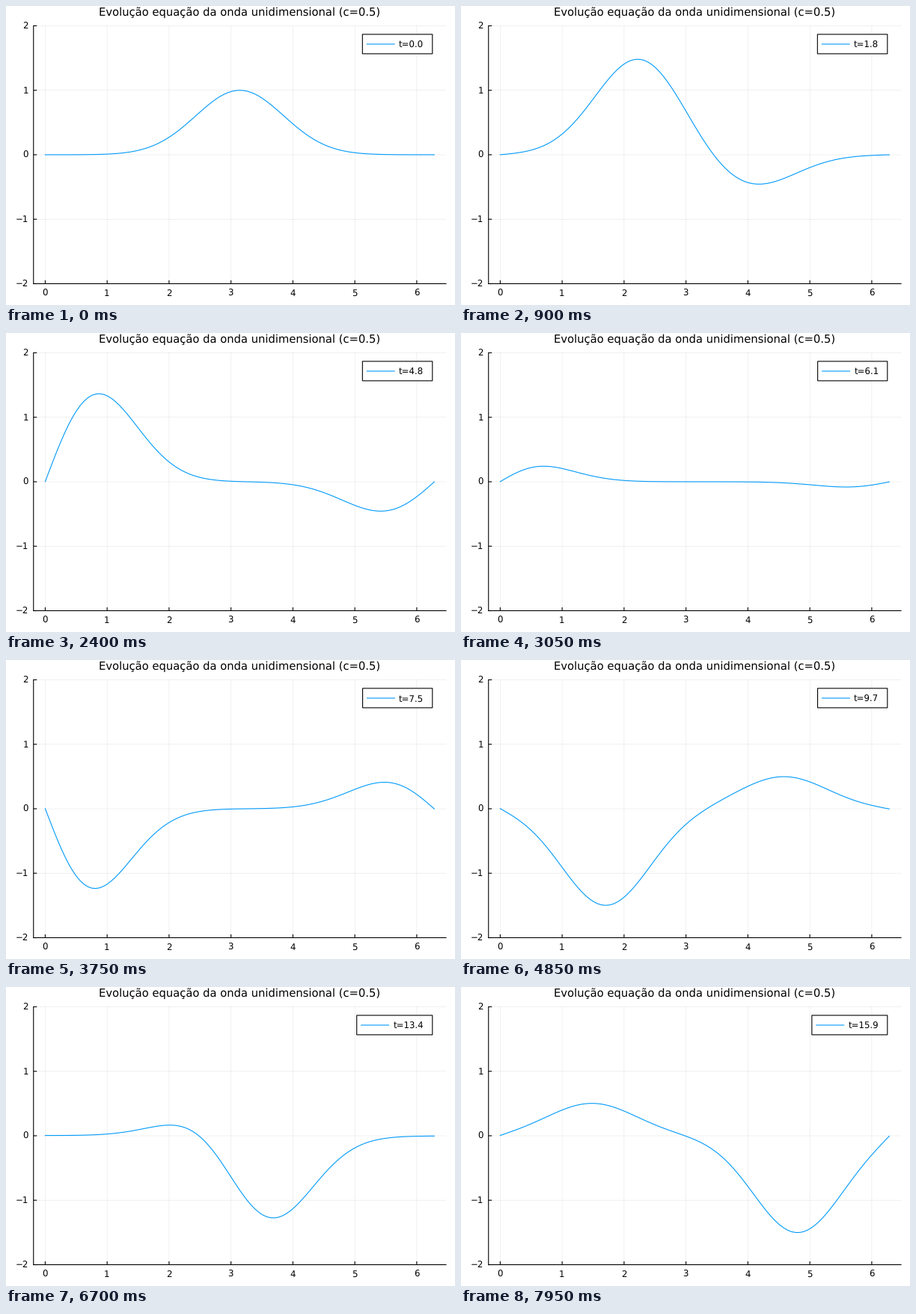
Write a matplotlib script that moves like this. It is 600 px wide and 400 px high and loops after 8000 ms.

```python
import numpy as np
import matplotlib.pyplot as plt
from matplotlib.animation import FuncAnimation
from matplotlib.patches import Rectangle
from matplotlib.textpath import TextPath

W, H, DPI = 600, 400, 100
PT = 72 / DPI                      # points per pixel
FRAMES, STEP_MS, DT = 160, 50, 0.1
C, L, POINTS, SUBSTEPS = 0.5, 2 * np.pi, 101, 10
BLUE = "#009afa"
SMALL, LARGE = 11.8, 14.75         # font sizes in pixels
LEFT, RIGHT, TOP, BOTTOM = 36.75, 588, 26.5, 371.5

plt.rcParams["font.family"] = "DejaVu Sans"
plt.rcParams["text.hinting"] = "none"

fig = plt.figure(figsize=(W / DPI, H / DPI), dpi=DPI, facecolor="white")
ax = fig.add_axes([0, 0, 1, 1])
ax.set_xlim(0, W)
ax.set_ylim(H, 0)
ax.axis("off")


def px(x):
    return 52.4 + 82.75 * x


def py(y):
    return 199 - 86.25 * y


def line(xs, ys, width=1.1, **kw):
    kw.setdefault("color", "black")
    return ax.plot(xs, ys, lw=width * PT, snap=False, **kw)[0]


def label(x, y, text, size=SMALL, ha="left"):
    return ax.text(x, y, text, fontsize=size * PT, ha=ha, va="baseline")


def ink_width(text):
    return TextPath((0, 0), text, size=SMALL).get_extents().width


def solve(x):
    """Wave equation by finite differences; no force acts on the two ends."""
    dx, dt = x[1] - x[0], DT / SUBSTEPS

    def force(u):
        a = np.zeros_like(u)
        a[1:-1] = (C / dx) ** 2 * (u[2:] - 2 * u[1:-1] + u[:-2])
        return a

    u = np.exp(-(x - np.pi) ** 2)
    v = -2 * (x - np.pi) * u
    states = []
    for _ in range(FRAMES):
        states.append(u.copy())
        for _ in range(SUBSTEPS):
            v = v + force(u) * dt / 2
            u = u + v * dt
            v = v + force(u) * dt / 2
    return states


# grid, ticks and tick labels
for v in range(7):
    line([px(v)] * 2, [TOP, BOTTOM], 0.55, alpha=0.1, zorder=1)
    line([px(v)] * 2, [BOTTOM, BOTTOM - 4.5], solid_capstyle="butt")
    label(px(v) - 0.4, 387.5, str(v), ha="center")
for v in range(-2, 3):
    line([LEFT, RIGHT], [py(v)] * 2, 0.55, alpha=0.1, zorder=1)
    line([LEFT, LEFT + 4.5], [py(v)] * 2, solid_capstyle="butt")
    label(29.9, py(v) + 3.9, str(v).replace("-", "\u2212"), ha="right")
line([LEFT, LEFT], [TOP, BOTTOM])
line([LEFT, RIGHT], [BOTTOM, BOTTOM])

label(312.5, 13, "Evolução equação da onda unidimensional (c=0.5)", LARGE, "center")

x = np.linspace(0, L, POINTS)
waves = solve(x)
curve = line(px(x), py(waves[0]), color=BLUE, zorder=3)

box = ax.add_patch(Rectangle((476, 37.9), 94, 26, fc="white", ec="black",
                             lw=1.1 * PT, zorder=4, snap=False))
sample = line([482, 519], [51, 51], color=BLUE, zorder=5)
stamp = label(525, 56, "t=0.0")
stamp.set_zorder(5)


def update(i):
    text = f"t={i * DT:.1f}"
    left = 508.5 - ink_width(text)
    curve.set_ydata(py(waves[i]))
    box.set_x(left)
    box.set_width(569.8 - left)
    sample.set_xdata([left + 6, left + 42.8])
    stamp.set_text(text)
    stamp.set_x(left + 48.6)
    return curve, box, sample, stamp


anim = FuncAnimation(fig, update, frames=FRAMES, interval=STEP_MS,
                     repeat=True, repeat_delay=0, blit=False)
plt.show()
```
